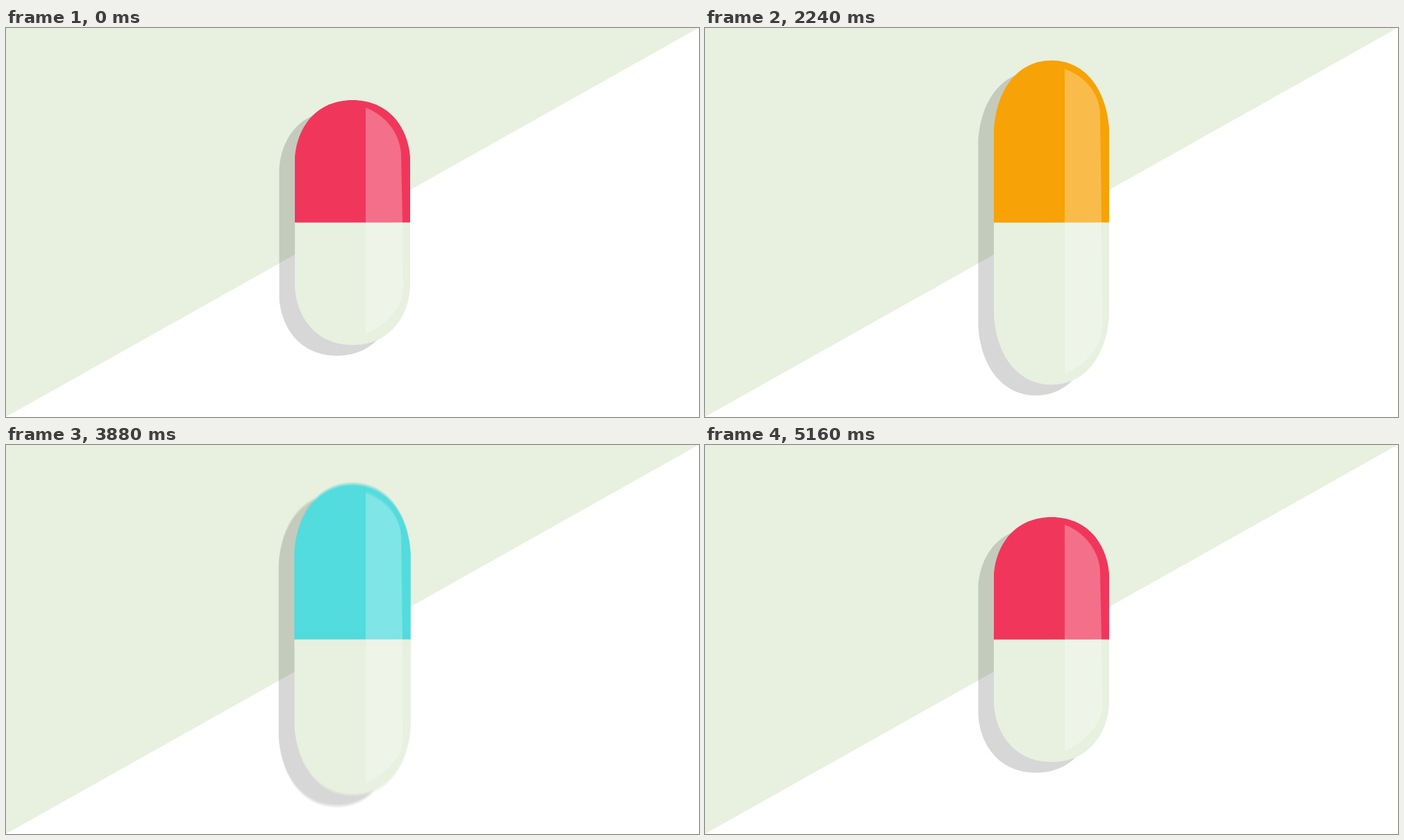
Write an HTML page with a canvas that moves like this. It is 998 by 561 pixels and loops after 5280 ms.

```html
<!DOCTYPE html>
<html lang="en">
<head>
<meta charset="utf-8">
<title>Pill</title>
<style>
  html, body { margin: 0; width: 100%; height: 100%; overflow: hidden; background: #fff; }
  canvas { display: block; }
</style>
</head>
<body>
<canvas id="stage" width="998" height="561"></canvas>
<script>
const W = 998, H = 561, LOOP = 5280, STEP = 40;
const CX = 499, CY = 280.6, DEPTH = 1386;
const SHUTTER = 20, SAMPLES = 12;

const ctx = document.getElementById('stage').getContext('2d');
const layer = document.createElement('canvas');
layer.width = W;
layer.height = H;
const g = layer.getContext('2d');

const PALE = [232, 240, 223], RED = [240, 55, 91], ORANGE = [247, 162, 6];
const CYAN = [74, 219, 221], BEIGE = [234, 234, 218], GROOVE = [183, 186, 177];

// half width, half height, cap height, then the shine: top, shoulder, lower shoulder, bottom
const SHORT = [83, 176.6, 82, -165.6, -97, 94, 160.5];
const TALL = [83, 233.8, 99, -221.6, -157, 150, 218.5];
const ROUND = [93.5, 95, 95, -90, -35, 37, 85];

// start and end of each move
const MOVES = { grow: [940, 1320], tint: [1980, 2240], flip: [2980, 3480], press: [3820, 4200], back: [4780, 5160] };

const mix = (a, b, k) => a.map((v, i) => v + (b[i] - v) * k);
const rgb = c => `rgb(${c.map(Math.round)})`;

function ease([from, to], t) {
  const p = Math.min(1, Math.max(0, (t - from) / (to - from)));
  return p * p * (3 - 2 * p);
}

function pose(t) {
  const grow = ease(MOVES.grow, t), press = ease(MOVES.press, t), back = ease(MOVES.back, t);
  let angle = ease(MOVES.flip, t) * Math.PI;
  const flipped = angle > Math.PI / 2;
  if (flipped) angle -= Math.PI;
  let shape = mix(SHORT, TALL, grow);
  let top = flipped ? CYAN : mix(RED, ORANGE, ease(MOVES.tint, t));
  shape = mix(mix(shape, ROUND, press), SHORT, back);
  top = mix(mix(top, BEIGE, press), RED, back);
  return { shape, top, angle, flat: press * (1 - back), base: back > 0 ? RED : CYAN };
}

// Turns points about the vertical axis, with perspective
function trace(points, angle, dx = 0, dy = 0) {
  const path = new Path2D(), c = Math.cos(angle), s = Math.sin(angle);
  for (const [x, y] of points) {
    const k = 1 / (1 + x * s / DEPTH);
    path.lineTo(CX + dx + x * c * k, CY + dy + y * k);
  }
  path.closePath();
  return path;
}

function curve(a, b, c, d) {
  const out = [];
  for (let i = 0; i <= 32; i++) {
    const t = i / 32, u = 1 - t;
    out.push([0, 1].map(n => u * u * u * a[n] + 3 * u * u * t * b[n] + 3 * u * t * t * c[n] + t * t * t * d[n]));
  }
  return out;
}

// Left edge to right edge over one end; side is -1 for the top, 1 for the bottom
function halfPill([w, h, cap], side) {
  const left = curve(
    [-w, side * (h - cap)],
    [-w * 0.955, side * (h - cap * 0.44)],
    [-w * 0.6, side * h],
    [0, side * h]);
  const right = left.map(([x, y]) => [-x, y]).reverse();
  return [[-w, 0], ...left, ...right, [w, 0]];
}

function shine([, , , top, upper, lower, bottom]) {
  const a = upper - top, b = bottom - lower;
  return [
    ...curve([19, top], [46, top + a * 0.15], [69, top + a * 0.52], [70, upper]),
    [72, 0],
    ...curve([73, lower], [74, lower + b * 0.42], [47, bottom - b * 0.18], [19, bottom])
  ];
}

function fill(path, color) {
  g.fillStyle = color;
  g.fill(path);
}

function drawScene(t) {
  const { shape, top, angle, flat, base } = pose(t);
  const upper = halfPill(shape, -1), lower = halfPill(shape, 1);
  const outline = [...upper, ...lower.slice().reverse()];

  g.fillStyle = '#fff';
  g.fillRect(0, 0, W, H);
  fill(new Path2D('M0 0H997L0 560.7Z'), rgb(PALE));

  fill(trace(outline, angle, -22.5, 15.5), 'rgba(0,0,0,0.157)');
  fill(trace(lower, angle), rgb(PALE));
  fill(trace(upper, angle), rgb(top));

  if (flat > 0) {
    g.save();
    g.clip(trace(outline, angle));
    g.fillStyle = rgb(mix(base, GROOVE, flat));
    g.globalAlpha = Math.min(1, flat * 4);
    g.fillRect(CX - 100, 271, 200, CY - 271);
    g.globalAlpha = 1;
    g.fillStyle = rgb(mix(PALE, GROOVE, flat ** 1.6));
    g.fillRect(CX - 100, CY, 200, 290 - CY);
    g.restore();
  }
  if (flat < 1) fill(trace(shine(shape), angle), `rgba(255,255,255,${0.28 * (1 - flat)})`);
}

function render(t) {
  const moving = Object.values(MOVES).some(([a, b]) => t > a && t < b);
  const n = moving ? SAMPLES : 1;
  for (let i = 0; i < n; i++) {
    drawScene(moving ? t + ((i + 0.5) / n - 0.5) * SHUTTER : t);
    ctx.globalAlpha = 1 / (i + 1);
    ctx.drawImage(layer, 0, 0);
  }
}

const start = performance.now();
let shown = -1;
function tick() {
  const t = Math.floor(((performance.now() - start) % LOOP) / STEP) * STEP;
  if (t !== shown) render(shown = t);
  requestAnimationFrame(tick);
}
tick();
</script>
</body>
</html>
```
